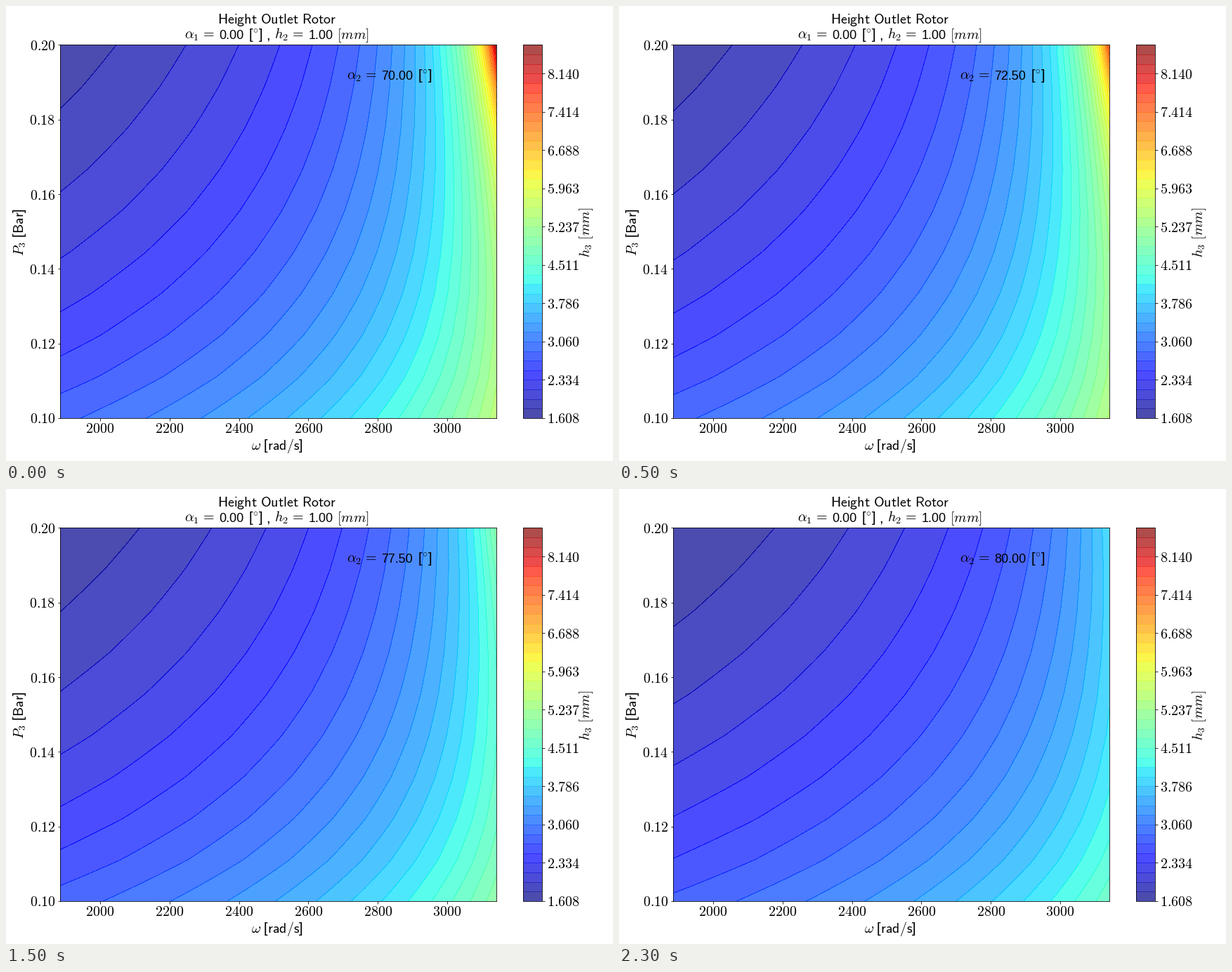
Recreate the animation shown at these times as a matplotlib script. Size 864 px wide and 648 px high, loop 2.5 s.

```python
import numpy as np
import matplotlib.pyplot as plt
from matplotlib.animation import ArtistAnimation

W, H = 864, 648
plt.rcParams["mathtext.fontset"] = "cm"
plt.rcParams["font.family"] = "Liberation Sans"
plt.rcParams["font.size"] = 20

fig = plt.figure(figsize=(W / 72, H / 72), dpi=72, facecolor="white")


def add_axes(left, top, right, bottom):
    return fig.add_axes([left / W, 1 - bottom / H, (right - left) / W, (bottom - top) / H])


def label(x, y, text, **kw):
    return fig.text(x / W, 1 - y / H, text, va="baseline", rotation_mode="anchor", **kw)


def number(x, y, value):
    return label(x, y, f"{value:.2f}", fontsize=18)


def sans(text):
    return r"$\mathsf{" + text.replace(" ", r"\ ") + "}$"


DEGREES = r"[$^{\circ}$]"

# Rotor speed and a coarse set of outlet pressures
omega = np.linspace(600 * np.pi, 1000 * np.pi, 100)
pressure = np.linspace(0.1, 0.2, 10)
X, Y = np.meshgrid(omega, pressure)
levels = np.linspace(1.6084, 8.6842, 40)
jet = plt.get_cmap("jet")
line_colors = jet((levels - levels[0]) / (levels[-1] - levels[0]))
LINE = dict(linewidths=0.5, alpha=0.85)

# Swirl coefficient for each inlet angle
swirl = {70.0: 2.7293e-4, 72.5: 2.718e-4, 75.0: 2.691e-4, 77.5: 2.6425e-4, 80.0: 2.5665e-4}


def height(b):
    """Outlet height from continuity with an isentropic expansion."""
    drop = np.log(0.2 / Y)
    flow = np.exp(-1.893 * drop) * (0.8707 - b * X + 0.1561 * drop)
    return np.clip(flow ** -0.5, levels[0], levels[-1])


ax = add_axes(77.2, 55.4, 698, 587)
frames = []
for angle, b in swirl.items():
    Z = height(b)
    fill = ax.contourf(X, Y, Z, levels, cmap=jet, alpha=0.7)
    lines = ax.contour(X, Y, Z, levels[1:-1], colors=line_colors[1:-1], **LINE)
    frames.append([fill, lines, number(534, 105, angle)])

ax.set_xlim(omega[0], omega[-1])
ax.set_ylim(0.1, 0.2)
ax.tick_params(axis="x", pad=3)
xticks = range(2000, 3001, 200)
yticks = np.arange(0.10, 0.201, 0.02)
ax.set_xticks(xticks, [f"${t}$" for t in xticks])
ax.set_yticks(yticks, [f"${t:.2f}$" for t in yticks])

cax = add_axes(736.4, 55.4, 763.2, 587)
bar = fig.colorbar(frames[0][0], cax=cax)
bar.set_ticks(levels[::4], labels=[f"${t:.3f}$" for t in levels[::4]])
bar.minorticks_off()
cax.hlines(levels[1:-1], 0, 1, colors=line_colors[1:-1], **LINE)

label(485, 105, r"$\alpha_2\hspace{0.13}=$")
label(585.5, 105, DEGREES)

label(385.5, 25, sans("Height Outlet Rotor"), ha="center")
label(254, 47, r"$\alpha_1\hspace{0.13}=$")
number(303, 47, 0)
label(345, 47, DEGREES)
label(370.5, 47, ",")
label(382.5, 47, r"$h_2\hspace{0.13}=$")
number(431, 47, 1)
label(471, 47, "$[mm]$")

label(386.5, 632, r"$\omega$ [" + sans("rad/s") + "]", ha="center")
label(25, 322, "$P_3$ [" + sans("Bar") + "]", ha="center", rotation=90)
label(831, 322, r"$h_3\ [mm]$", ha="center", rotation=90)

anim = ArtistAnimation(fig, frames, interval=500, repeat=True, repeat_delay=0)
plt.show()
```
